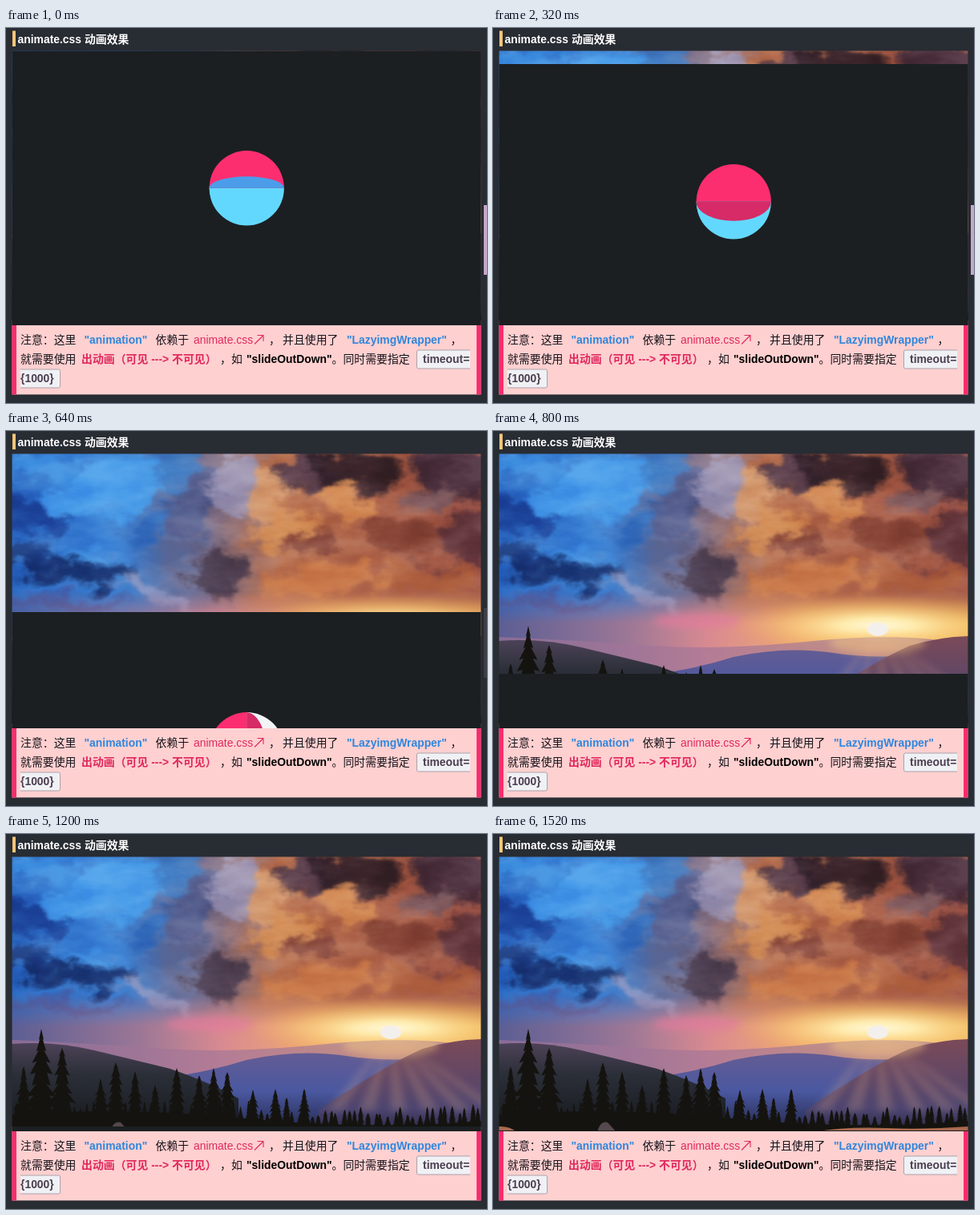
Write an HTML page that moves like this. It is 600 px wide and 468 px high and loops after 1.6 s.

```html
<!DOCTYPE html>
<html lang="zh-CN">
<head>
<meta charset="utf-8">
<title>animate.css 动画效果</title>
<style>
html, body { margin: 0; width: 100%; height: 100%; overflow: hidden; background: #282c33; }
svg { position: absolute; left: 0; top: 0; display: block; }
#photo { will-change: transform; }
text {
  font: 13.9px "Liberation Sans", "Noto Sans CJK SC", "Noto Sans CJK", sans-serif;
  text-spacing-trim: space-all;
  fill: #17131a;
  white-space: pre;
}
.b { font-weight: 700; }
.blue { fill: #2f86dd; }
.pink { fill: #e0285e; }
.code { fill: #4b3e50; }
</style>
</head>
<body>
<svg id="photo" width="600" height="468" viewBox="0 0 600 468">
  <defs>
    <clipPath id="frame"><rect x="7.600" y="28.600" width="584.800" height="343"/></clipPath>
    <linearGradient id="sky" x1="0" x2="1" y1="0" y2="0">
      <stop offset="0" stop-color="#2560bd"/>
      <stop offset=".25" stop-color="#3a82d6"/>
      <stop offset=".42" stop-color="#77708f"/>
      <stop offset=".56" stop-color="#b8704f"/>
      <stop offset="1" stop-color="#9c5146"/>
    </linearGradient>
    <linearGradient id="dusk" x1="0" x2="1" y1="0" y2="0">
      <stop offset="0" stop-color="#595d94"/>
      <stop offset=".28" stop-color="#9c7796"/>
      <stop offset=".45" stop-color="#d98a90"/>
      <stop offset=".65" stop-color="#f0ac72"/>
      <stop offset="1" stop-color="#f0b964"/>
    </linearGradient>
    <linearGradient id="fade" x1="0" x2="0" y1="0" y2="1">
      <stop offset="0" stop-color="#fff" stop-opacity="0"/>
      <stop offset=".4" stop-color="#fff"/>
    </linearGradient>
    <linearGradient id="fadeOut" x1="0" x2="0" y1="0" y2="1">
      <stop offset=".65" stop-color="#fff"/>
      <stop offset="1" stop-color="#fff" stop-opacity="0"/>
    </linearGradient>
    <mask id="low"><rect x="0" y="200" width="600" height="100" fill="url(#fade)"/></mask>
    <mask id="high"><rect x="0" y="20" width="600" height="215" fill="url(#fadeOut)"/></mask>
    <radialGradient id="glow">
      <stop offset="0" stop-color="#fff9dc"/>
      <stop offset=".25" stop-color="#ffeeb0" stop-opacity=".95"/>
      <stop offset=".6" stop-color="#fbd27c" stop-opacity=".5"/>
      <stop offset="1" stop-color="#f0a050" stop-opacity="0"/>
    </radialGradient>
    <linearGradient id="valley" x1="0" x2="0" y1="0" y2="1">
      <stop offset="0" stop-color="#655c93"/>
      <stop offset=".5" stop-color="#4a58a0"/>
      <stop offset="1" stop-color="#22264a"/>
    </linearGradient>
    <linearGradient id="ridge" x1="0" x2="0" y1="0" y2="1">
      <stop offset="0" stop-color="#7b4a58"/>
      <stop offset=".75" stop-color="#4c4470"/>
      <stop offset="1" stop-color="#2b2a48"/>
    </linearGradient>
    <linearGradient id="slope" x1="0" x2="0" y1="0" y2="1">
      <stop offset="0" stop-color="#4d4258"/>
      <stop offset=".35" stop-color="#2b2f38"/>
      <stop offset="1" stop-color="#15171c"/>
    </linearGradient>
    <filter id="cloud" filterUnits="userSpaceOnUse" x="-40" y="-20" width="680" height="330" color-interpolation-filters="sRGB">
      <feGaussianBlur stdDeviation="5" result="soft"/>
      <feTurbulence type="fractalNoise" baseFrequency=".022 .03" numOctaves="4" seed="6"/>
      <feColorMatrix values="1 0 0 0 0  0 1 0 0 0  0 0 1 0 0  0 0 0 0 1" result="bump"/>
      <feDisplacementMap in="soft" in2="bump" scale="55" xChannelSelector="R" yChannelSelector="G"/>
    </filter>
    <filter id="wisps" filterUnits="userSpaceOnUse" x="0" y="20" width="600" height="240" color-interpolation-filters="sRGB">
      <feTurbulence type="fractalNoise" baseFrequency=".013 .03" numOctaves="5" seed="11"/>
      <feColorMatrix values="2.2 0 0 0 -.6  2.2 0 0 0 -.6  2.2 0 0 0 -.6  0 0 0 0 1"/>
    </filter>
    <filter id="haze" x="-30%" y="-80%" width="160%" height="260%"><feGaussianBlur stdDeviation="5"/></filter>
  </defs>
  <g clip-path="url(#frame)" style="isolation:isolate">
    <g id="clouds" filter="url(#cloud)"><rect x="-40" y="-20" width="680" height="330" fill="url(#sky)"/></g>
    <g mask="url(#high)" style="mix-blend-mode:soft-light" opacity=".25"><rect x="0" y="20" width="600" height="240" filter="url(#wisps)"/></g>
    <rect x="0" y="200" width="600" height="100" fill="url(#dusk)" mask="url(#low)"/>
    <ellipse cx="255" cy="237" rx="55" ry="9" fill="#e27c9c" opacity=".7" filter="url(#haze)"/>
    <ellipse cx="480" cy="243" rx="185" ry="38" fill="url(#glow)"/>
    <path d="M7 257Q120 262 200 268T400 262T600 268V372H7Z" fill="#a27598" opacity=".65"/>
    <path d="M190 305Q250 298 300 282Q365 268 425 277Q470 284 520 280L600 270V372H190Z" fill="url(#valley)"/>
    <path d="M390 345Q470 290 520 268Q560 256 600 256V372H390Z" fill="url(#ridge)"/>
    <g id="rays" fill="#f7bd8c" opacity=".2" filter="url(#haze)"></g>
    <ellipse cx="480" cy="264" rx="60" ry="14" fill="#ffcf80" opacity=".4" filter="url(#haze)"/>
    <ellipse cx="480" cy="247.500" rx="13" ry="8.500" fill="#f3efec"/>
    <path d="M7 262Q60 258 110 270T205 293Q250 308 290 330V372H7Z" fill="url(#slope)"/>
    <path id="wood" fill="#14130f"/>
    <path d="M400 372Q440 365 490 367T593 365V372ZM7 372V365Q20 364 30 372Z" fill="#a8694e"/>
    <path d="M130 372Q134 357 143 360L154 372Z" fill="#55484e"/>
  </g>
</svg>

<svg id="stage" width="600" height="468" viewBox="0 0 600 468">
  <defs><clipPath id="view"><rect x="7.600" y="28.600" width="584.800" height="343"/></clipPath></defs>
  <rect x="8" y="3.500" width="4" height="19.500" fill="#f3c677"/>
  <text class="b" x="14.500" y="18.500" style="fill:#fff">animate.css 动画效果</text>
  <g clip-path="url(#view)">
    <g id="cover">
      <rect x="7" y="28" width="586" height="344" fill="#1b1f22"/>
      <g transform="translate(300.200 199.800)">
        <g id="turn">
          <path id="back" d="M-46.700 0A46.700 46.700 0 0 1 46.700 0Z"/>
          <path id="front" d="M-46.700 0A46.700 46.700 0 0 0 46.700 0Z"/>
          <path id="flap"/>
        </g>
      </g>
    </g>
  </g>
  <rect id="thumb" x="596" y="221" width="5" height="87" fill="#c4a8ca"/>
  <rect x="7.600" y="371" width="584.800" height="86.400" fill="#ffd0d0"/>
  <path d="M7.600 371h5.400v86.400h-5.400zM587 371h5.400v86.400h-5.400z" fill="#fa2c6e"/>
  <text x="18" y="394">注意：这里</text>
  <text class="b blue" x="97.500" y="394">"animation"</text>
  <text x="186.500" y="394">依赖于</text>
  <text class="pink" x="234" y="394">animate.css</text>
  <path d="M310 394.500L320.500 384M313.500 383.500H321V391" fill="none" stroke="#e0285e" stroke-width="1.100"/>
  <text x="328" y="394">，</text>
  <text x="345" y="394">并且使用了</text>
  <text class="b blue" x="425" y="394">"LazyimgWrapper"</text>
  <text x="554.500" y="394">，</text>
  <text x="18" y="418">就需要使用</text>
  <text class="b pink" x="94" y="418">出动画（可见 ---&gt; 不可见）</text>
  <text x="267" y="418">，如</text>
  <text class="b" x="300" y="418" style="fill:#000">"slideOutDown"</text>
  <text x="406.500" y="418">。同时需要指定</text>
  <g fill="#f0f1f4" stroke="#a9a3ab">
    <path d="M579 402H514.500a2 2 0 0 0 -2 2V423a2 2 0 0 0 2 2H579"/>
    <path d="M18 426H65.500a2 2 0 0 1 2 2V447a2 2 0 0 1 -2 2H18"/>
  </g>
  <text class="b code" x="520" y="418">timeout=</text>
  <text class="b code" x="18" y="442">{1000}</text>
</svg>

<script>
const LOOP = 1600, STEP = 80, TRAVEL = 342, R = 46.7;
const CYAN = [99, 216, 254], BLUE = [74, 154, 232];
const PINK = [252, 46, 112], ROSE = [208, 42, 100];
const WHITE = [242, 244, 246], GREY = [205, 208, 212];
const $ = id => document.getElementById(id);
const mix = (a, b, k) => a + (b - a) * k;
const rgb = (a, b = a, k = 0) => `rgb(${a.map((v, i) => Math.round(mix(v, b[i], k)))})`;

function add(parent, tag, attrs) {
  const el = document.createElementNS("http://www.w3.org/2000/svg", tag);
  for (const key in attrs) el.setAttribute(key, attrs[key]);
  parent.appendChild(el);
}

let seed = 17;
function rand() {
  seed = (seed * 16807) % 2147483647;
  return seed / 2147483647;
}

// Sky patches: x, y, rx, ry, angle, colour
const coolClouds = [
  [130, 70, 85, 34, -15, "#4a9fec"],
  [215, 45, 30, 35, 10, "#467fc4"],
  [45, 45, 50, 16, -10, "#3d8fe2"],
  [25, 105, 45, 22, 15, "#1f459d"],
  [185, 120, 45, 16, -25, "#356fbf"],
  [75, 172, 90, 17, 8, "#152a66"],
  [30, 155, 35, 14, 0, "#1a377f"],
  [95, 155, 50, 6, 6, "#489bea"],
  [185, 205, 50, 12, 25, "#8e9bc6"],
  [70, 212, 75, 9, 4, "#48549a"],
  [238, 90, 22, 50, 20, "#565f8e"],
  [285, 65, 30, 42, 30, "#a09ab8"]
];
const warmClouds = [
  [265, 175, 32, 36, 20, "#4a3b4e"],
  [325, 85, 28, 34, 25, "#d89d70"],
  [345, 120, 35, 20, -20, "#d8935a"],
  [425, 90, 46, 16, 20, "#d88f58"],
  [375, 52, 32, 24, 0, "#50394a"],
  [440, 50, 52, 26, 5, "#30202a"],
  [560, 50, 60, 32, 15, "#432c3c"],
  [530, 85, 35, 16, -10, "#7a585f"],
  [380, 138, 35, 13, -10, "#83443a"],
  [500, 135, 55, 20, 10, "#884639"],
  [400, 185, 85, 18, -5, "#cf7f4e"],
  [530, 185, 65, 18, 10, "#b0613f"],
  [580, 135, 40, 36, 0, "#5e343c"]
];

function buildClouds() {
  for (const [cx, cy, rx, ry, turn, fill] of coolClouds.concat(warmClouds))
    add($("clouds"), "ellipse", { cx, cy, rx, ry, fill, opacity: .9, transform: `rotate(${turn} ${cx} ${cy})` });
}

function buildRays() {
  for (let i = 0; i < 6; i++) {
    const x = 400 + i * 40;
    add($("rays"), "path", { d: `M480 250L${x} 345H${x + 20}Z` });
  }
}

function tree(x, top, width) {
  const tiers = 9, h = 371 - top;
  let left = "", right = "";
  for (let i = 1; i <= tiers; i++) {
    const y = top + h * i / tiers, w = width * (i / tiers) ** .8 * mix(.7, 1.15, rand());
    right += `L${x + w} ${y}L${x + w * .5} ${y - 2}`;
    left = `L${x - w * .5} ${y - 2}L${x - w} ${y}` + left;
  }
  return `M${x} ${top}${right}${left}Z`;
}

function buildWood() {
  const tall = [[44, 243], [70, 267], [22, 290], [118, 305], [137, 285], [161, 296], [186, 313],
    [213, 292], [241, 301], [259, 292], [276, 297], [308, 319], [336, 318], [372, 318], [350, 329]];
  let d = tall.map(([x, y]) => tree(x, y, (371 - y) * .17 + 4)).join("");
  for (let x = 10; x < 596; x += 8) {
    const low = x < 300 ? 328 : 339;
    d += tree(x + rand() * 5, low + rand() * 14 - (x > 540 ? 5 : 0), 7);
  }
  $("wood").setAttribute("d", d + "M7 372V350Q150 340 300 355T593 358V372Z");
}

function track(keys, t) {
  if (t <= keys[0][0]) return keys[0][1];
  for (let i = 1; i < keys.length; i++) {
    const [t0, a] = keys[i - 1], [t1, b] = keys[i];
    if (t <= t1) return mix(a, b, (t - t0) / (t1 - t0));
  }
  return keys[keys.length - 1][1];
}

// cubic-bezier(.25, .1, .25, 1)
function ease(x) {
  const curve = (a, b, s) => 3 * a * s * (1 - s) ** 2 + 3 * b * s * s * (1 - s) + s ** 3;
  let lo = 0, hi = 1;
  for (let i = 0; i < 24; i++) {
    const mid = (lo + hi) / 2;
    if (curve(.25, .25, mid) < x) lo = mid; else hi = mid;
  }
  return curve(.1, 1, lo);
}

const slide = [[250, 0], [320, .066], [480, .218], [640, .335], [800, .502], [1200, .84], [1520, 1]];
const thumbFade = [[380, 1], [480, .55], [640, .14], [720, 0]];
const firstFlip = [[0, 72], [320, 121], [480, 180]];
const nextFlip = [[480, 0], [640, 59], [970, 180]];

function drawFlip(t) {
  const first = t < 480;
  const angle = track(first ? firstFlip : nextFlip, t) * Math.PI / 180;
  const c = Math.cos(angle), s = Math.sin(angle);
  const [from, fromShade, to, toShade] = first ? [CYAN, BLUE, PINK, ROSE] : [PINK, ROSE, WHITE, GREY];
  $("turn").setAttribute("transform", first ? "" : "rotate(90)");
  $("back").setAttribute("fill", rgb(to));
  $("front").setAttribute("fill", rgb(from));
  $("flap").setAttribute("d", `M${-R} 0A${R} ${Math.max(.01, Math.abs(c) * R)} 0 0 ${c > 0 ? 1 : 0} ${R} 0Z`);
  $("flap").setAttribute("fill", c > 0 ? rgb(from, fromShade, s) : rgb(to, toShade, s));
}

function draw(t) {
  $("cover").setAttribute("transform", `translate(0 ${Math.round(TRAVEL * ease(track(slide, t)))})`);
  $("thumb").setAttribute("opacity", track(thumbFade, t));
  drawFlip(t);
}

buildClouds();
buildRays();
buildWood();
const start = performance.now();
function tick() {
  const t = (performance.now() - start) % LOOP;
  draw(Math.floor(t / STEP) * STEP);
  requestAnimationFrame(tick);
}
tick();
</script>
</body>
</html>
```
